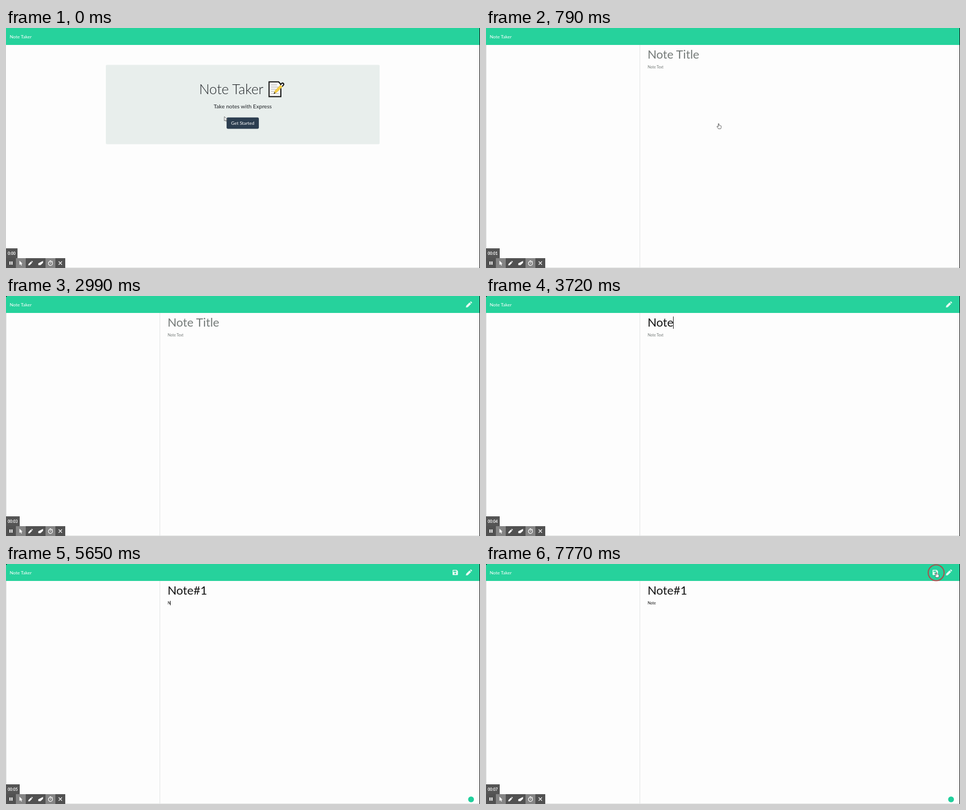
Animation, 864 px wide and 439 px high, one loop 8000 ms. Source, as an HTML page:

```html
<!DOCTYPE html>
<html lang="en">
<head>
<meta charset="utf-8">
<title>Note Taker</title>
<style>
  html, body { margin: 0; width: 100%; height: 100%; overflow: hidden; background: #fdfdfd; }
  svg { display: block; font-family: Lato, sans-serif; }
  .title { font-size: 21.6px; }
  .body { font-size: 6.75px; }
  .mid { text-anchor: middle; }
</style>
</head>
<body>
<svg width="864" height="439" viewBox="0 0 864 439">
  <defs>
    <path id="arrow" d="M0 0V8L1.9 6.3 3.2 9 4.5 8.4 3.3 5.8H5.6Z" stroke-width=".7"/>
    <path id="hand" d="M-.7 .6Q0-.4.7.6V3.6Q1.6 3 2.2 3.9 3.2 3.4 3.6 4.3 4.7 4 4.7 5.2V7Q4.7 8.2 3.8 9.8H-.5Q-1.3 8.2-3 6.2-3.3 5-2 5.2L-.7 6.2Z" stroke-width=".8"/>
    <path id="pencil" d="M0 11 .6 7.8 6.6 1.8 9.4 4.6 3.4 10.6ZM7.4 1 8.4.2Q9 -.3 9.6.2L11 1.6Q11.5 2.2 11 2.8L10.2 3.8Z"/>
  </defs>

  <rect width="864" height="439" fill="#fdfdfd"/>
  <path d="M0 438.5H864" stroke="#e2e4e3"/>
  <rect width="864" height="31" fill="#26d29c"/>
  <text x="6.75" y="19" font-size="8.4375" fill="#fff">Note Taker</text>

  <g id="home">
    <rect x="182" y="67.5" width="499" height="145" rx="1.8" fill="#e8eeec"/>
    <text x="352" y="120.5" font-size="25.2" font-weight="300" fill="#212529">Note Taker</text>
    <g stroke="#111" stroke-width="2">
      <path d="M479.5 98.5H497L501 103V125.500H479.500Z" fill="#fafafa"/>
      <path d="M483 104H494M483 108H496M483 112H492M483 116H490M483 120H497" stroke="#aaa" stroke-width="1.1"/>
      <path d="M488.500 120 490.500 114.500 501 103.500 504.500 107 493.500 117.500Z" fill="#f6cf45" stroke="#d8ad35" stroke-width=".7"/>
      <path d="M500 104 503.500 100.500Q506.500 101 506.300 103.500L503.500 107" fill="#f4f4f4"/>
      <path d="M488 120.500 489.200 117.500 491 119Z" stroke="none"/>
    </g>
    <text class="mid" x="431.5" y="146.700" font-size="10.125" fill="#212529">Take notes with Express</text>
    <rect id="button" x="402.500" y="164" width="58" height="20" rx="1.800"/>
    <text class="mid" x="431.5" y="177" font-size="8.4375" fill="#fff">Get Started</text>
  </g>

  <g id="notes">
    <path d="M.5 31V439M280.500 31V439" stroke="#e3e5e4"/>
    <text id="title" class="title" x="294.400" y="56.300"></text>
    <text id="body" class="body" x="294.700" y="74.300"></text>
    <rect id="caret" width="1" fill="#222"/>
    <use id="edit" href="#pencil" x="838.300" y="10" fill="#e9faf3"/>
    <path id="save" fill="#e9faf3" fill-rule="evenodd" d="M814.800 10.800H821.500L823.800 13V19.300Q823.800 20.200 823 20.200H814.800Q814 20.200 814 19.300V11.700Q814 10.800 814.800 10.800ZM815.400 12.200V14.500H820.700V12.200ZM818.900 15.800A1.500 1.500 0 1 0 818.901 15.800Z"/>
    <circle id="badge" cx="847.700" cy="430.500" r="5.300" fill="#1fcf9b"/>
  </g>

  <path id="corner" d="M0 0H2L0 2Z"/>
  <rect x="863" width="1" height="439" fill="#111"/>

  <rect id="clockBox" y="403" height="18" fill="#555"/>
  <text id="clock" class="mid" y="414.500" font-size="7" font-weight="700" fill="#fff"></text>
  <rect y="421" width="108" height="18" fill="#515151"/>
  <path d="M18 421H36V439H18ZM72 421H90V439H72Z" fill="#858585"/>
  <g fill="#fff">
    <path d="M6.300 427H8.300V433H6.300ZM9.800 427H11.800V433H9.800Z"/>
    <use href="#arrow" x="24.500" y="425.500"/>
    <use href="#pencil" transform="translate(40.500 426) scale(.75)"/>
    <path d="M58.800 430.500 67.500 426V429.500L63 433.800H58.800Z"/>
    <path d="M79.500 425.700H82.500M81 427V425.700M84 427.300 85 426.300M81 428.500V430.800M84.800 430.600A3.800 3.800 0 1 1 84.800 430.500M96 427 102 433M102 427 96 433" fill="none" stroke="#fff" stroke-width="1.100"/>
  </g>

  <circle id="ring" fill="none" stroke="#dc1f30" stroke-opacity=".72" stroke-width="2"/>
  <use id="pointer" fill="#fff" stroke="#444"/>
</svg>
<script>
const $ = id => document.getElementById(id);
const LOOP = 8000;
const start = {
  page: 'home', clock: '0:00', button: 'idle', pointer: ['arrow', 398, 162], ring: null,
  title: '', body: '', caret: null, edit: false, save: false, badge: false, corner: false
};

// Each step changes part of the state at the given time in ms.
const steps = [
  [100, { pointer: ['arrow', 401, 163] }],
  [250, { pointer: ['hand', 412, 171], button: 'hover', clock: '00:00' }],
  [380, { pointer: ['hand', 421, 174] }],
  [510, { pointer: ['hand', 424, 174.5] }],
  [640, { button: 'active', ring: [424, 174, 6] }],
  [790, { page: 'notes', clock: '00:01', ring: null }],
  [1180, { pointer: ['arrow', 414.5, 172.5], edit: true }],
  [1570, { pointer: null }],
  [1870, { clock: '00:02', corner: true }],
  [2015, { caret: 'title', ring: [351, 59, 8] }],
  [2160, { ring: [351, 59, 14.5] }],
  [2660, { caret: null, ring: null }],
  [2840, { clock: '00:03' }],
  [3020, { title: 'N', caret: 'title' }],
  [3200, { title: 'No' }],
  [3390, { title: 'Not' }],
  [3570, { title: 'Note' }],
  [3720, { clock: '00:04' }],
  [4090, { caret: null }],
  [4250, { title: 'Note#', caret: 'title' }],
  [4580, { title: 'Note#1' }],
  [4820, { caret: 'body' }],
  [5120, { clock: '00:05', badge: true }],
  [5320, { caret: null }],
  [5650, { body: 'N', caret: 'body', save: true }],
  [5850, { body: 'No' }],
  [6060, { body: 'Not', clock: '00:06' }],
  [6390, { body: 'Note' }],
  [7000, { caret: null, clock: '00:07' }],
  [7150, { pointer: ['arrow', 610, 42] }],
  [7300, { pointer: ['arrow', 760, 24] }],
  [7460, { pointer: ['hand', 821, 15] }],
  [7620, { ring: [820.5, 16, 8] }],
  [7770, { ring: [820.5, 16, 14.5] }]
];

const fields = {
  title: { hint: 'Note Title', top: 37.5, height: 22.5 },
  body: { hint: 'Note Text', top: 67.5, height: 8 }
};
const buttonFill = { idle: '#2c3e50', hover: '#1e2b37', active: '#17222c' };

const set = (id, attrs) => {
  for (const name in attrs) $(id).setAttribute(name, attrs[name]);
};
const show = (id, on) => set(id, { visibility: on ? 'inherit' : 'hidden' });

function render(s) {
  for (const page of ['home', 'notes']) show(page, s.page === page);
  for (const id of ['edit', 'save', 'badge', 'corner']) show(id, s[id]);
  for (const id of ['caret', 'ring', 'pointer']) show(id, s[id]);

  const boxWidth = s.clock.length > 4 ? 25 : 21;
  set('clockBox', { width: boxWidth });
  set('clock', { x: boxWidth / 2 - .2 });
  $('clock').textContent = s.clock;
  set('button', {
    fill: buttonFill[s.button],
    stroke: s.button === 'active' ? '#8799a6' : buttonFill[s.button],
    'stroke-width': s.button === 'active' ? 1.6 : .8
  });

  for (const id in fields) {
    $(id).textContent = s[id] || fields[id].hint;
    set(id, { fill: s[id] ? '#111' : '#747a78' });
  }
  if (s.caret) {
    const { top, height } = fields[s.caret];
    const typed = s[s.caret] ? $(s.caret).getComputedTextLength() : 0;
    set('caret', { x: 294 + Math.round(typed), y: top, height });
  }
  if (s.ring) {
    const [cx, cy, r] = s.ring;
    set('ring', { cx, cy, r });
  }
  if (s.pointer) {
    const [shape, x, y] = s.pointer;
    set('pointer', { href: '#' + shape, x, y });
  }
}

function frame(now) {
  const time = now % LOOP;
  const past = steps.filter(([at]) => at <= time).map(([, change]) => change);
  render(Object.assign({}, start, ...past));
  requestAnimationFrame(frame);
}
requestAnimationFrame(frame);
</script>
</body>
</html>
```
